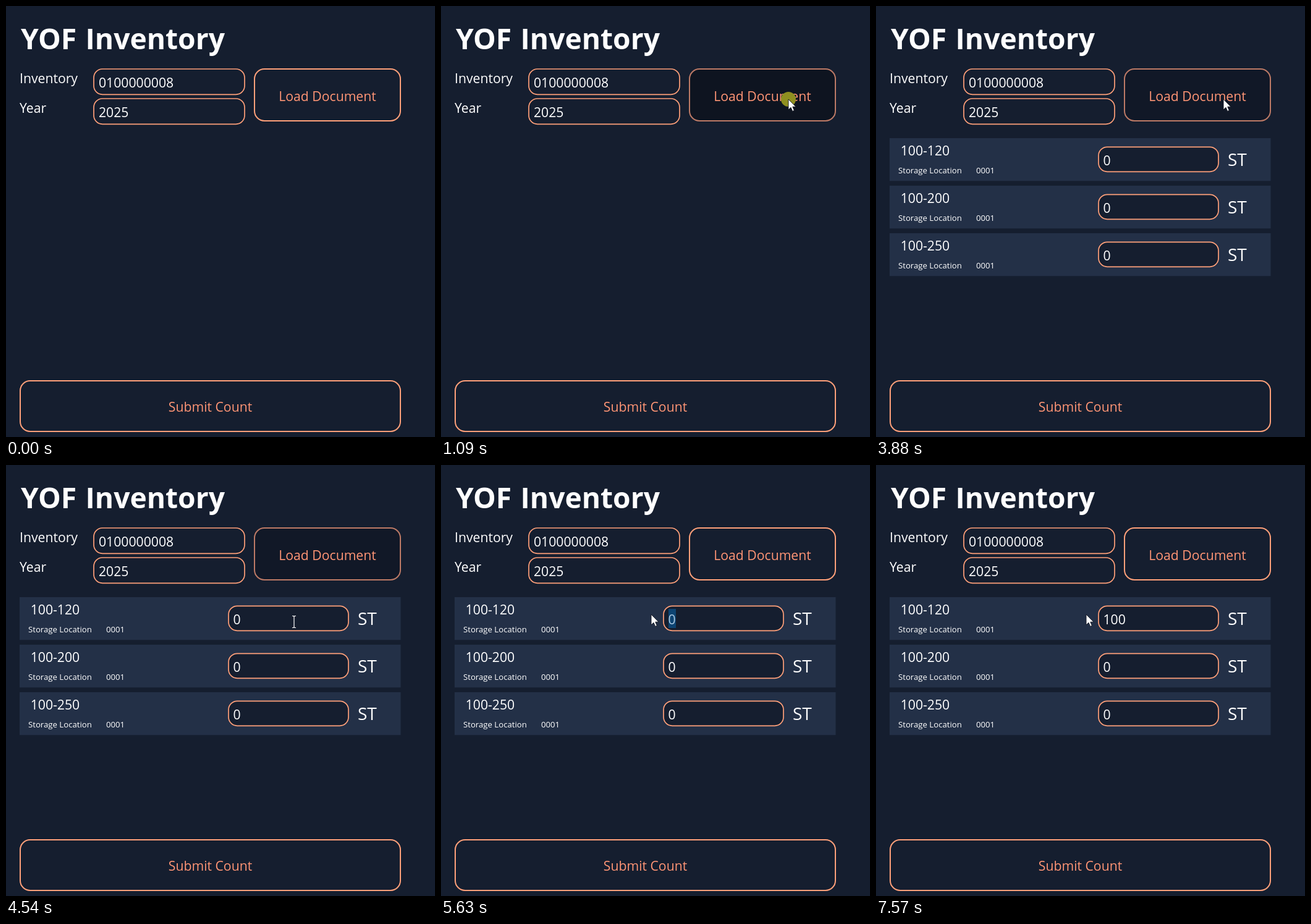
Write an HTML page that moves like this. It is 694 px wide and 698 px high and loops after 8 s.

```html
<!DOCTYPE html>
<html lang="en">
<head>
<meta charset="utf-8">
<title>Inventory count</title>
<style>
  html, body { margin: 0; width: 100%; height: 100%; overflow: hidden; background: #151e2f; }
  svg { display: block; width: 694px; height: 698px; }
  text { font: 21.2px "Open Sans", "Noto Sans", sans-serif; fill: #fff; }
  .title { font-size: 46.2px; font-weight: 700; }
  .small { font-size: 13.2px; }
  .unit { font-size: 28px; }
  .label { fill: #ff9575; text-anchor: middle; }
  .field { fill: #151e2f; stroke: #ffa07a; stroke-width: 1.7; }
  .button { fill: #151e2f; stroke: #ffa07a; stroke-width: 2; }
  .hover { fill: #111827; stroke: #bd7a66; }
  .pressed { fill: #0e1420; stroke: #bd7a66; }
</style>
</head>
<body>
<svg id="stage" viewBox="0 0 694 698" xmlns="http://www.w3.org/2000/svg"></svg>
<script>
const NS = "http://www.w3.org/2000/svg";
const LOOP = 8000;
const stage = document.getElementById("stage");

function add(parent, tag, attrs, content) {
  const el = document.createElementNS(NS, tag);
  for (const key in attrs) el.setAttribute(key, attrs[key]);
  if (content !== undefined) el.textContent = content;
  parent.appendChild(el);
  return el;
}
const text = (parent, x, y, content, cls = "") =>
  add(parent, "text", { x, y, class: cls }, content);
const box = (parent, x, y, width, height, rx, cls) =>
  add(parent, "rect", { x, y, width, height, rx, class: cls });
const show = (el, on) => el.setAttribute("visibility", on ? "visible" : "hidden");

add(stage, "rect", { width: 694, height: 698, fill: "#151e2f" });
text(stage, 24, 70, "YOF", "title");
text(stage, 128.5, 70, "Inventory", "title");
text(stage, 22, 125, "Inventory");
text(stage, 22, 173, "Year");
box(stage, 142, 102, 244, 41.3, 14, "field");
box(stage, 142, 150, 244, 41.3, 14, "field");
text(stage, 150, 132, "0100000008");
text(stage, 150, 180, "2025");

const load = box(stage, 402, 102, 236, 84, 16, "button");
text(stage, 520, 154, "Load Document", "label");
box(stage, 23, 607, 615, 82, 16, "button");
text(stage, 330.5, 657, "Submit Count", "label");

// Item list
const list = add(stage, "g", {});
const counts = ["100-120", "100-200", "100-250"].map((name, i) => {
  const row = add(list, "g", { transform: `translate(0 ${i * 77})` });
  add(row, "rect", { x: 22, y: 214, width: 616.5, height: 69.3, fill: "#233047" });
  text(row, 39.7, 242, name);
  text(row, 36, 271, "Storage Location", "small");
  text(row, 162, 271, "0001", "small");
  box(row, 360, 228.3, 194, 40, 14, "field");
  text(row, 569, 259, "ST", "unit");
  return text(row, 367.5, 258, "0");
});
const marked = add(list, "rect", { x: 368, y: 233, width: 12, height: 31, fill: "#0d4472" });
counts[0].parentNode.insertBefore(marked, counts[0]);
const caret = add(list, "rect", { x: 379, y: 234, width: 1.2, height: 29, fill: "#fff" });

// Pointer
const halo = add(stage, "circle", { r: 12, fill: "#8f8f20" });
const arrow = add(stage, "path", {
  d: "M0 0V17L4 13.3 6.6 19.4 9.4 18.2 6.8 12.2H12Z",
  fill: "#fff", stroke: "#101420", "stroke-width": 0.9, "stroke-linejoin": "round"
});
const beam = add(stage, "path", {
  d: "M-3 -9.5H-1L0 -8.5 1 -9.5H3M0 -8.5V8.5M-3 9.5H-1L0 8.5 1 9.5H3",
  fill: "none", stroke: "#fff", "stroke-width": 1.2
});

// Each move: start time, step length, then one point per step
const moves = [
  { at: 260, step: 70, path: [[668, 673], [650, 600], [626, 505], [603, 415], [585, 337],
    [578, 250], [573, 186], [568, 167], [564, 156], [562, 151]] },
  { at: 4260, step: 70, path: [[560, 154], [544, 172], [512, 207], [483, 238], [466, 254], [460, 258]] },
  { at: 4830, step: 65, path: [[459, 257], [419, 258], [352, 260], [266, 268], [206, 272]] },
  { at: 5370, step: 65, path: [[206, 272], [240, 264], [290, 251], [330, 244], [340, 242]] }
];

function pointer(t) {
  const move = moves.filter(m => t >= m.at).pop();
  if (!move) return null;
  const k = Math.floor((t - move.at) / move.step);
  return move.path[Math.min(k, move.path.length - 1)];
}

function typed(t) {
  if (t < 7110) return "0";
  return t < 7440 ? "1" : t < 7570 ? "10" : "100";
}

function draw(t) {
  const within = (a, b) => t >= a && t < b;
  const p = pointer(t);
  const listed = t >= 3880;
  const clicking = within(1090, 1350);
  const dragging = within(4830, 5370);
  const selected = within(5025, 7110);

  load.setAttribute("class", "button" +
    (clicking ? " pressed" : within(750, 4830) ? " hover" : ""));
  show(list, listed);
  show(marked, selected);
  show(caret, within(4830, 5025));
  counts[0].textContent = typed(t);
  counts[0].style.fill = selected ? "#a9c8e2" : "#fff";

  const inField = p && listed && p[0] > 360 && p[0] < 554 && p[1] > 228 && p[1] < 269;
  show(arrow, p && !inField);
  show(beam, inField);
  show(halo, p && (within(1090, 1280) || dragging));
  if (p) {
    for (const el of [arrow, beam, halo]) {
      el.setAttribute("transform", `translate(${p[0]} ${p[1]})`);
    }
  }
}

const start = performance.now();
function tick() {
  draw((performance.now() - start) % LOOP);
  requestAnimationFrame(tick);
}
tick();
</script>
</body>
</html>
```
